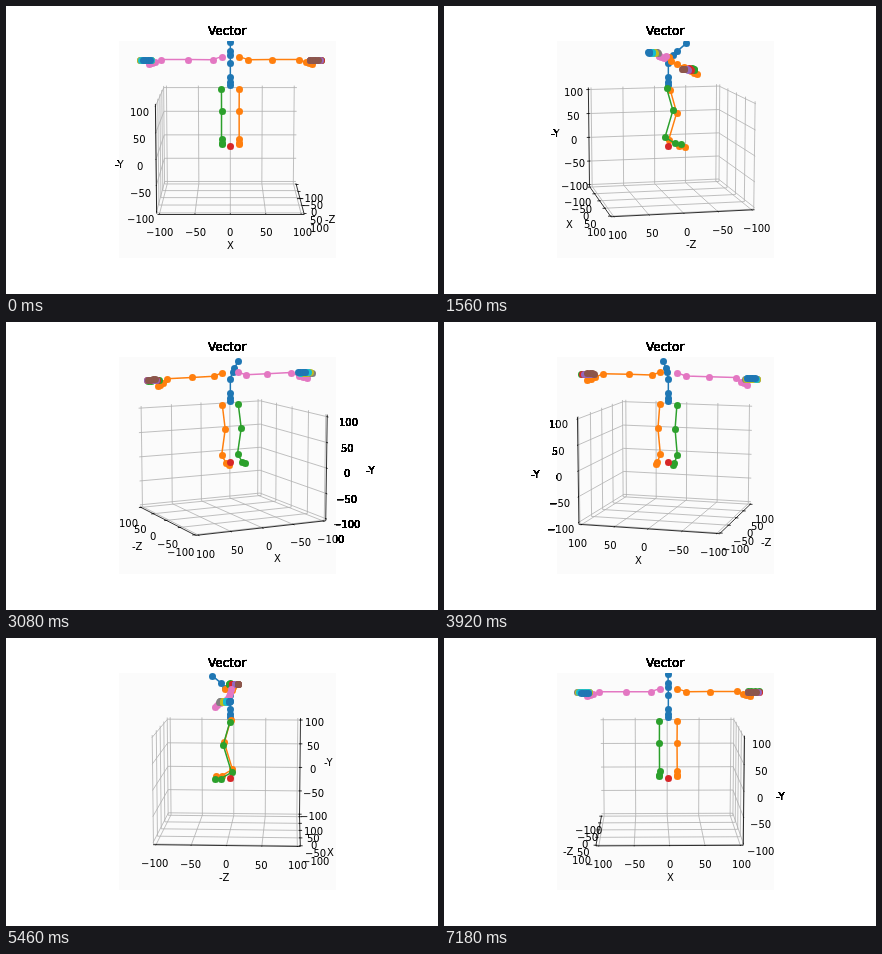
Write an HTML page with a canvas that moves like this. It is 432 by 288 pixels and loops after 7200 ms.

```html
<!DOCTYPE html>
<html lang="en">
<head>
<meta charset="utf-8">
<title>Vector</title>
<style>
html, body { margin: 0; width: 100%; height: 100%; overflow: hidden; background: #fff; }
canvas { display: block; }
</style>
</head>
<body>
<canvas id="stage" width="432" height="288"></canvas>
<script>
const ctx = document.getElementById('stage').getContext('2d');
const FONT = 'px "DejaVu Sans", sans-serif';
const COLORS = ['#1f77b4', '#ff7f0e', '#2ca02c', '#d62728', '#9467bd',
                '#8c564b', '#e377c2', '#7f7f7f', '#bcbd22', '#17becf'];
const EDGE = 104.167, TICK_TEXT = 125.33, AXIS_TEXT = 150.15;
const BOX = [113, 35, 217, 217];
const ELEV = Math.PI / 18, CE = Math.cos(ELEV), SE = Math.sin(ELEV);
const range = (n, f) => Array.from({ length: n }, (_, i) => f(i));
const TICKS = range(5, i => 50 * i - 100);

// Joints as [x, height, depth] in camera units; the head leans away from the neck
const spine = [.873, .808, .774, .714, .594, .547, .526].map(u => {
  const lean = Math.max(0, u - .714);
  return [0, u, -.55 * lean - 2.6 * lean ** 2];
});
const arm = [.073, .149, .352, .579].map(x =>
  [x, .74 + .34 * Math.max(0, .149 - x), .01 - .017 * x]);
const thumb = range(3, i => [.635 + .028 * i, .712 - .01 * i, -.05 - .017 * i]);
const fingers = range(4, k => {
  const step = (.095 - .0035 * k * k) / 3;
  return range(4, i => [.67 + step * i, .736, .025 * k - .045]);
});
const leg = [[.493, 0], [.297, -.056], [.065, .014], [.01, -.077], [.005, -.128]]
  .map(p => [.075, ...p]);
const mirror = chain => chain.map(([x, u, w]) => [-x, u, w]);
const limb = [[...arm, ...thumb], ...fingers];
const chains = [spine, ...limb, ...limb.map(mirror), leg, mirror(leg), [[0, 0, 0]]];

function camera(deg) {
  const a = deg * Math.PI / 180, c = Math.cos(a), s = Math.sin(a);
  const project = ([x, u, w]) => {
    const side = x * c - w * s, near = x * s + w * c;
    const k = 1175.35 / (10 - near * CE - u * SE);
    return [224.34 + side * k, 140.34 - (u * CE - near * SE) * k];
  };
  const data = ([x, y, z]) => project([x / 175, y * 3 / 700, z / 175]);
  const bx = s >= 0 ? -1 : 1, bz = c >= 0 ? -1 : 1;   // signs of the rear walls
  const ex = bx * EDGE, ez = bz * EDGE;
  // at(v, r, t): value v on the axis, t measured along the tick direction
  const axes = [
    { name: 'X', at: (v, r, t) => [v, -r, -bz * t],
      grid: v => [[v, -EDGE, -ez], [v, -EDGE, ez], [v, EDGE, ez]] },
    { name: '-Y', at: (v, r, t) => [bx * r, v, -bz * t],
      grid: v => [[-ex, v, ez], [ex, v, ez], [ex, v, -ez]] },
    { name: '-Z', at: (v, r, t) => [-bx * t, -r, v],
      grid: v => [[-ex, -EDGE, v], [ex, -EDGE, v], [ex, EDGE, v]] }
  ];
  return { project, data, axes };
}

const snap = v => Math.round(v) + .5;

function path(points, color, width) {
  const level = points.every(p => Math.abs(p[1] - points[0][1]) < 1e-4);
  ctx.strokeStyle = color;
  ctx.lineWidth = width;
  ctx.beginPath();
  points.forEach(p => ctx.lineTo(...(level ? p.map(snap) : p)));
  ctx.stroke();
}

function label(text, [x, y], drop, size = 10) {
  ctx.font = size + FONT;
  ctx.fillStyle = '#000';
  const m = ctx.measureText(text);
  const ink = m.actualBoundingBoxRight + m.actualBoundingBoxLeft;
  ctx.fillText(text, Math.round(x - ink / 2), Math.round(y + drop));
}

function drawText({ data, axes }) {
  label('Vector', [221.4, 28.56], 0, 12);
  for (const { name, at } of axes) {
    for (const v of TICKS)
      label(String(v).replace('-', '\u2212'), data(at(v, TICK_TEXT, TICK_TEXT)), 8);
    label(name, data(at(0, AXIS_TEXT, AXIS_TEXT)), 3);
  }
}

function drawAxes({ data, axes }) {
  for (const { grid } of axes)
    for (const v of TICKS) path(grid(v).map(data), '#b0b0b0', .8);
  for (const { at } of axes) {
    path([-EDGE, EDGE].map(v => data(at(v, EDGE, EDGE))), '#000', .8);
    for (const v of TICKS)
      path([-1.67, 3.33].map(d => data(at(v, EDGE, EDGE + d))), '#000', .8);
  }
}

function drawBody({ project }) {
  ctx.save();
  ctx.beginPath();
  ctx.rect(...BOX);
  ctx.clip();
  chains.forEach((chain, i) => {
    const points = chain.map(project), color = COLORS[i % 10];
    if (points.length > 1) path(points, color, 1.5);
    ctx.fillStyle = color;
    for (const [x, y] of points) {
      ctx.beginPath();
      ctx.arc(snap(x), snap(y), 3.5, 0, 7);
      ctx.fill();
    }
  });
  ctx.restore();
}

function draw(now) {
  const view = camera(Math.floor(now / 20) % 360);
  ctx.fillStyle = '#fff';
  ctx.fillRect(0, 0, 432, 288);
  for (let i = 0; i < 16; i++) drawText(view);   // hard-edged text outside the box
  ctx.fillStyle = '#fbfbfb';
  ctx.fillRect(...BOX);
  drawAxes(view);
  drawText(view);
  drawBody(view);
}

ctx.lineJoin = 'round';
ctx.fontKerning = 'normal';
const start = performance.now();
function loop() {
  draw(performance.now() - start);
  requestAnimationFrame(loop);
}
loop();
</script>
</body>
</html>
```
